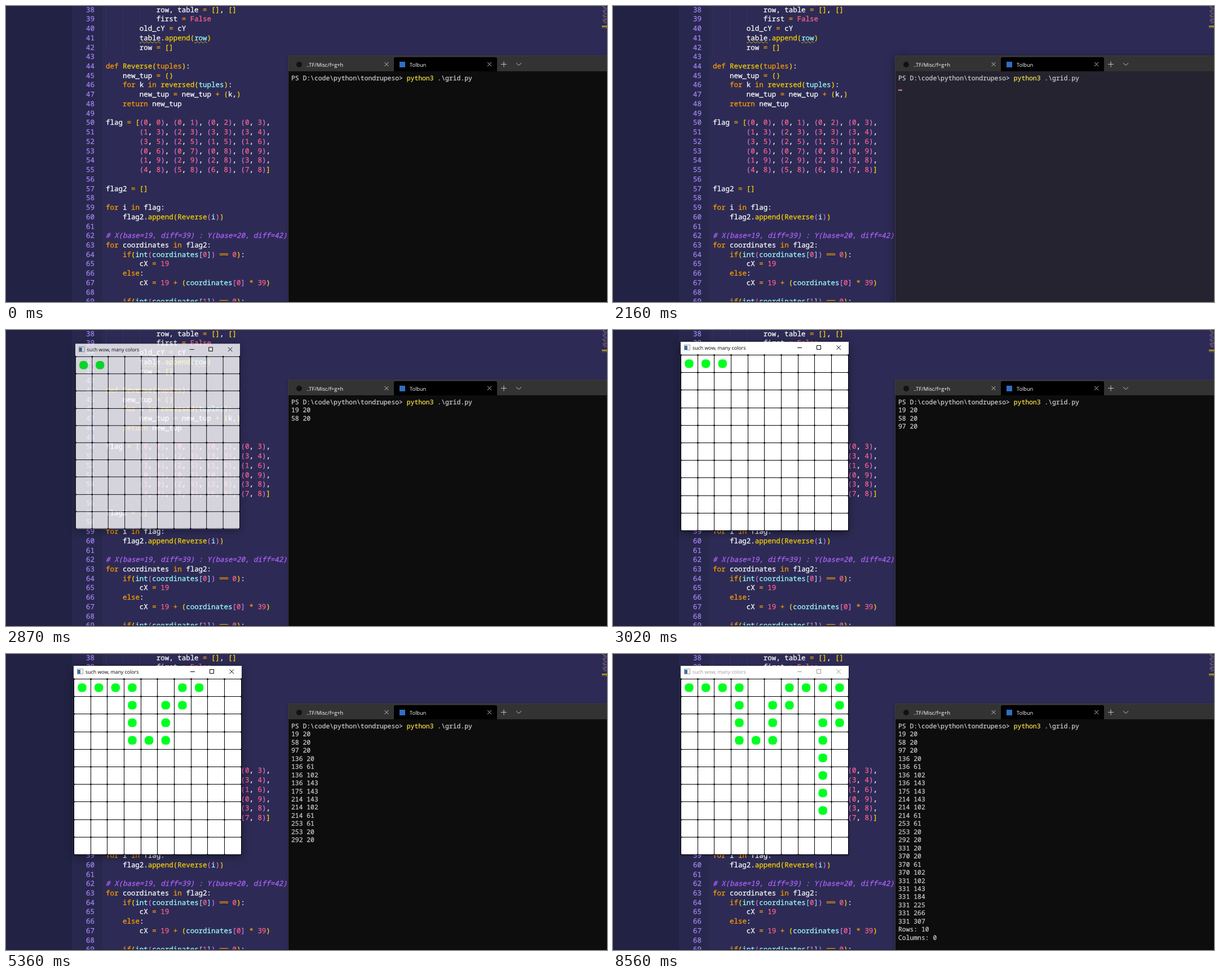
These frames come from a looping animation (1066x526 px, 8640 ms). An HTML page:

```html
<!DOCTYPE html>
<html lang="en">
<head>
<meta charset="utf-8">
<title>Grid plot</title>
<style>
html, body { margin: 0; width: 100%; height: 100%; overflow: hidden; }
body { background: #2d2b55; text-rendering: geometricPrecision; }
#stage { position: absolute; inset: 0; width: 1066px; height: 526px; overflow: hidden; }
#stage > *, svg { position: absolute; }
pre { margin: 0; position: absolute; white-space: pre; -webkit-text-stroke: 0.25px currentColor; }

#sidebar { left: 0; top: 0; width: 117px; height: 526px; background: #222244; }
#gutter { left: 117px; top: 0; width: 54px; height: 526px; background: #28284e; }
#status { left: 0; top: 525px; width: 1066px; height: 1px; background: #1e1e3f; }
#numbers, #code { top: -1.4px; font: 12.48px/16.74px "Noto Sans Mono", monospace; }
#numbers { left: 142px; color: #a585f2; }
#code { left: 177px; color: #fff; }
.key { color: #ff9d00; }
.num { color: #ff628c; }
.fn { color: #fad000; }
.arg { color: #9effff; }
.b0 { color: #ffd700; }
.b1 { color: #da70d6; }
.b2 { color: #87cefa; }
.note { color: #b362ff; font-style: italic; }
.warn { text-decoration: underline wavy #d8b400 1px; text-underline-offset: 1px; text-decoration-skip-ink: none; }
.guide { width: 1px; background: #35335f; }

#terminal { left: 500px; top: 88px; width: 580px; height: 450px; }
#terminal svg, #game svg { left: 0; top: 0; }
#terminal pre { left: 6px; top: 33.9px; color: #ccc; font: 11.39px/14.45px "Noto Sans Mono", monospace; }
#terminal b { color: #f2df49; font-weight: inherit; }
#cursor { position: absolute; width: 7px; height: 3px; background: #aa629c; }

#game { left: 120px; top: 21px; width: 298px; height: 336px; background: #fff; }
svg text { font-family: "Open Sans", "Noto Sans", sans-serif; }
.line { fill: none; stroke: currentColor; }
.frame { color: #3c3c40; }
</style>
</head>
<body>
<div id="stage">
  <div id="sidebar"></div>
  <div id="gutter"></div>
  <div class="guide" style="left:177px;top:0;height:83px"></div>
  <div class="guide" style="left:207px;top:0;height:83px"></div>
  <div class="guide" style="left:237px;top:0;height:32px"></div>
  <pre id="numbers"></pre>
  <pre id="code"></pre>
  <svg id="minimap" width="1066" height="45"></svg>
  <div id="status"></div>

  <div id="terminal">
    <svg width="580" height="450" viewBox="500 88 580 450" color="#c4c4c4">
      <path fill="#333" d="M500 88h580v28H500z"/>
      <path fill="#000" d="M688 116V94q0-3 3-3h177q3 0 3 3v22z"/>
      <path class="line frame" d="M500.5 538V88.5H1080"/>
      <circle cx="520" cy="104" r="5" fill="#111"/>
      <rect x="698" y="99" width="10" height="10" fill="#2f6fc4"/>
      <text x="533" y="107.5" font-size="9.3" fill="#fff">..TF/Misc/f=g+h</text>
      <text x="716" y="107.5" font-size="9.2" fill="#fff">Tolbun</text>
      <path class="line" d="M671.5 100l7 7m0-7l-7 7M854 100l7 7m0-7l-7 7M878 103.5h10m-5-5v10M905 101.5l4.5 4 4.5-4"/>
    </svg>
    <pre><span>PS D:\code\python\tondrupeso&gt; <b>python3</b> .\grid.py</span>
<span id="output"></span></pre>
    <div id="cursor"></div>
  </div>

  <div id="game">
    <svg width="298" height="336" viewBox="120 21 298 336">
      <rect x="126.5" y="26.5" width="10" height="9" fill="#fff" stroke="#9aa3ad"/>
      <path fill="#3f6fa5" d="M127 28h5v7h-5z"/>
      <g id="caption">
        <text x="141" y="34.7" font-size="8.8" fill="currentColor">such wow, many colors</text>
        <path class="line" d="M327 31.5h8M361.5 27.5h7v7h-7zM396.5 27.5l7.5 7.5m0-7.5l-7.5 7.5"/>
      </g>
      <g id="grid"></g>
      <g id="dots" fill="#00ff21"></g>
    </svg>
  </div>
</div>

<script>
const $ = id => document.getElementById(id);
const LOOP = 8640;

const source = `            row, table = [], []
            first = False
        old_cY = cY
        table.append(row)
        row = []

def Reverse(tuples):
    new_tup = ()
    for k in reversed(tuples):
        new_tup = new_tup + (k,)
    return new_tup

flag = [(0, 0), (0, 1), (0, 2), (0, 3),
        (1, 3), (2, 3), (3, 3), (3, 4),
        (3, 5), (2, 5), (1, 5), (1, 6),
        (0, 6), (0, 7), (0, 8), (0, 9),
        (1, 9), (2, 9), (2, 8), (3, 8),
        (4, 8), (5, 8), (6, 8), (7, 8)]

flag2 = []

for i in flag:
    flag2.append(Reverse(i))

# X(base=19, diff=39) : Y(base=20, diff=42)
for coordinates in flag2:
    if(int(coordinates[0]) == 0):
        cX = 19
    else:
        cX = 19 + (coordinates[0] * 39)

    if(int(coordinates[1]) == 0):`;
const lines = source.split('\n');

// Bracket nesting carries over from line to line; true marks a call.
const nesting = [];

function highlight(line) {
  if (line[0] === '#') return `<span class="note">${line}</span>`;
  let previous = '';
  const kindOf = (token, next) => {
    if (/[(\[]/.test(token)) return 'b' + (nesting.push(previous === 'fn' || previous === 'arg') - 1) % 3;
    if (/[)\]]/.test(token)) { nesting.pop(); return 'b' + nesting.length % 3; }
    if (/^(def|for|in|return|if|else|[=+*]+)$/.test(token)) return 'key';
    if (/^(\d+|False)$/.test(token)) return 'num';
    if (!/\w/.test(token)) return '';
    if (token === 'int') return 'arg';
    if (next === '(') return 'fn';
    if (nesting.includes(true)) return line.startsWith('def') ? 'key' : 'arg';
    return next === '[' ? 'arg' : '';
  };
  return line.replace(/\w+|==|[^]/g, (token, at) => {
    const kind = kindOf(token, line[at + token.length]);
    previous = kind;
    const warn = line.includes('table.append') && /table|row/.test(token) ? ' warn' : '';
    return kind || warn ? `<span class="${kind}${warn}">${token === '==' ? '══' : token}</span>` : token;
  });
}

$('numbers').textContent = lines.map((_, i) => i + 38).join('\n');
$('code').innerHTML = lines.map(highlight).join('\n');

const cells = [...source.matchAll(/\((\d), (\d)\)/g)].map(m => ({ row: +m[1], col: +m[2] }));
const rect = (x, y, w, h, extra) => `<rect x="${x}" y="${y}" width="${w}" height="${h}" ${extra}/>`;

// Minimap
const tints = ['#8f86bd', '#b08a45', '#7a75a8', '#a9577c'];
let map = '';
for (let i = 0; i < 16; i++) {
  map += rect(1058 + i * 5 % 4, i * 2, 3 + i * 7 % 5, 1, `fill="${tints[i % 4]}" opacity=".75"`);
}
$('minimap').innerHTML = map + rect(1057, 35, 9, 2, 'fill="#c9a90c"') + rect(1057, 38, 9, 1, 'fill="#8d7a22"');

// Grid and dots
const STEP_X = 29.65, STEP_Y = 31.2;
const gridX = i => Math.round(120 + i * STEP_X) + 0.5;
const gridY = i => Math.round(44 + i * STEP_Y) + 0.5;
let path = '', joints = '';
for (let i = 0; i <= 10; i++) {
  path += `M${gridX(i)} 44V357M120 ${gridY(i)}H418`;
  for (let j = 0; j <= 10; j++) joints += `<circle cx="${gridX(i)}" cy="${gridY(j)}" r="1.5"/>`;
}
$('grid').innerHTML = `<path d="${path}" stroke="#000"/>${joints}`;
$('dots').innerHTML = cells.map(({ row, col }) =>
  rect(127.3 + col * STEP_X, 52.2 + row * STEP_Y, 15.4, 15.2, 'rx="6.3"')).join('');
const dots = [...$('dots').children];

// Timeline
const plotTimes = [2560, 2790, 3020, 3260, 3490, 3640, 3860, 4070, 4290, 4510, 4740, 4950,
  5160, 5360, 5510, 5730, 5910, 6120, 6330, 6530, 6740, 6940, 7160, 7400];
const output = cells.map(({ row, col }, i) => [plotTimes[i], `${19 + col * 39} ${20 + row * 41}`]);
output.push([7570, 'Rows: 10'], [7640, 'Columns: 0']);

// Value of the latest [time, value] pair that has begun.
const at = (t, steps) => steps.reduce((value, step) => t >= step[0] ? step[1] : value, steps[0][1]);
const glass = [[0, 0], [130, 0.25], [210, 0.5], [290, 0.8], [360, 1], [2560, 0.7], [2640, 0.3], [2720, 0]];
const opening = [[0, 0], [2790, 0.4], [2870, 0.8], [2950, 1]];
const cursorRow = [[0, -1], [130, 0], [760, -1], [910, 1], [1540, -1], [2160, 1], [2560, -1]];
const shadow = focus => `0 ${1 + 2 * focus}px ${4 + 10 * focus}px rgba(0,0,0,${0.3 + 0.15 * focus})`;
const mix = (from, to, k) => from + (to - from) * k;

function draw(t) {
  const focus = at(t, glass);
  const terminal = $('terminal').style;
  terminal.background = `rgb(${mix(13, 36, focus)},${mix(13, 35, focus)},${mix(13, 47, focus)})`;
  terminal.boxShadow = shadow(focus);

  const row = at(t, cursorRow);
  const cursor = $('cursor').style;
  cursor.display = row < 0 ? 'none' : 'block';
  cursor.left = (row ? 6 : 327.5) + 'px';
  cursor.top = (row ? 60 : 45) + 'px';
  $('output').textContent = output.filter(([time]) => t >= time).map(([, text]) => text).join('\n');

  const shown = at(t, opening);
  const active = t < 8560;
  const game = $('game').style;
  game.opacity = shown;
  game.transform = shown < 1 ? `scale(${mix(0.9, 1, shown)})` : 'none';
  game.boxShadow = shadow(active ? 1 : 0);
  $('caption').style.color = active ? '#000' : '#999';
  dots.forEach((dot, i) => dot.style.display = t >= plotTimes[i] ? '' : 'none');
}

const start = performance.now();
function tick() {
  draw((performance.now() - start) % LOOP);
  requestAnimationFrame(tick);
}
tick();
</script>
</body>
</html>
```
